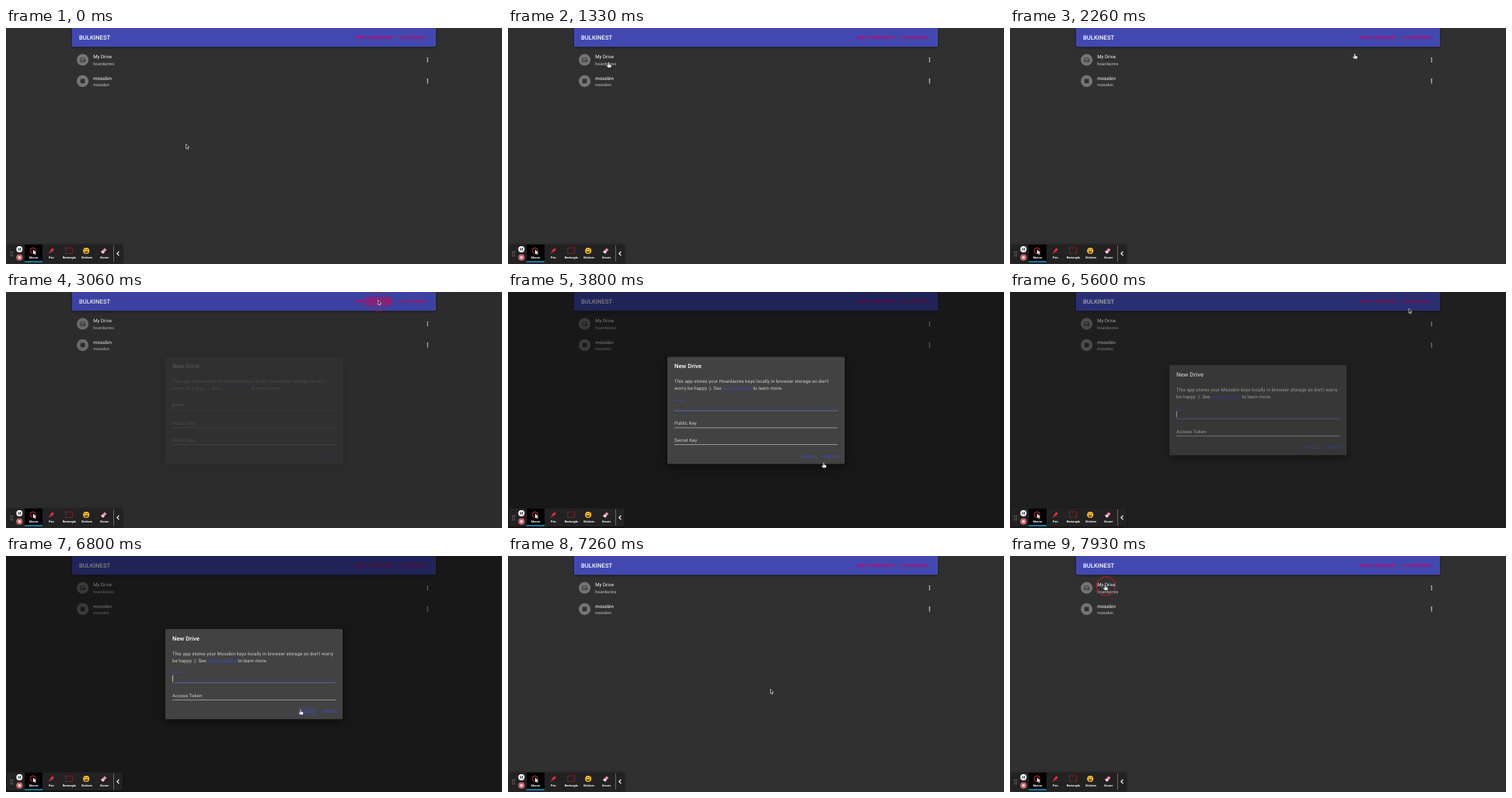
An HTML page that plays this animation: 638x304 px, repeating every 8 s.

```html
<!DOCTYPE html>
<html lang="en">
<head>
<meta charset="utf-8">
<title>Drive list</title>
<style>
  html, body { margin: 0; width: 100%; height: 100%; overflow: hidden; background: #303030; }
  svg { display: block; width: 638px; height: 304px; }
  text { font-family: Roboto, sans-serif; font-size: 6.08px; letter-spacing: .0094em; fill: #fff; text-rendering: geometricPrecision; white-space: pre; }
  .title { font-size: 7.6px; font-weight: 500; letter-spacing: .0075em; }
  .button { font-size: 5.32px; font-weight: 500; letter-spacing: .0286em; }
  .soft { fill: #fffb; }
  .small { font-size: 5.32px; }
  .pink { fill: #d8005f; }
  .blue { fill: #3f4bb5; }
  .mid { text-anchor: middle; }
  .tool { font-size: 3.8px; font-weight: 700; text-anchor: middle; letter-spacing: 0; }
  .bar { filter: drop-shadow(0 1px 1.5px #0007); }
  .paper { fill: #424242; filter: drop-shadow(0 4px 6px #0008); }
</style>
</head>
<body>
<svg viewBox="0 0 638 304">
  <defs>
    <clipPath id="addClip"><rect id="addBox" rx="1.5"/></clipPath>
  </defs>
  <rect width="638" height="304" fill="#303030"/>
  <rect class="bar" x="85" width="468" height="24.2" fill="#4149b1"/>
  <text class="title" x="94" y="15">BULKINEST</text>
  <rect id="hover" rx="1.5"/>
  <circle id="ripple" fill="#f50057" clip-path="url(#addClip)"/>
  <text class="button pink" x="496.8" y="14.1" text-anchor="end">ADD HOARDACRES</text>
  <text class="button pink" x="540.8" y="14.1" text-anchor="end">ADD MOSSBIN</text>
  <g id="rows"></g>

  <rect id="backdrop" width="638" height="304"/>
  <g id="dialogs"></g>

  <g id="toolbar">
    <rect x="1" y="278.5" width="149" height="23.5" rx="2" fill="#222" class="bar"/>
    <path d="M5.5 288.5h3.5M5.5 291h3.5M5.5 293.5h3.5" stroke="#aaa" stroke-width=".9" stroke-dasharray="1.1 1.2"/>
    <circle cx="17.3" cy="285" r="4" fill="#fff"/>
    <path d="M16.2 283.2v3.6M18.4 283.2v3.6" stroke="#222" stroke-width="1.1"/>
    <circle cx="17.3" cy="295.6" r="3.7" fill="#e5404b" stroke="#f3b5b9" stroke-width=".6"/>
    <rect x="15.8" y="294.1" width="3" height="3" fill="#fff"/>
    <rect x="24" y="279" width="23" height="22.5" fill="#000"/>
    <rect x="24" y="300.2" width="23" height="1.5" fill="#18a0d8"/>
    <circle cx="34.8" cy="286.8" r="3.6" fill="none" stroke="#e0404c" stroke-width=".9"/>
    <path d="M35 285.5v6l1.4-1.3 1 2 .9-.4-.9-2h1.8z" fill="#fff"/>
    <path d="M55.3 290.2l.6-2.5 1.7 1.8zM56.4 287l3.4-3.6 2 2-3.5 3.6z" fill="#f0323c"/>
    <rect x="76.8" y="283.2" width="9" height="7.4" fill="none" stroke="#c81e28" stroke-width=".9" stroke-dasharray="1.8 1"/>
    <circle cx="103.2" cy="287" r="4" fill="#f8c32c"/>
    <path d="M100.7 287.6h5q-.4 2.5-2.5 2.5t-2.5-2.5z" fill="#7a3b12"/>
    <path d="M101 285.6h1.4M104 285.6h1.4" stroke="#5a3010" stroke-width=".9"/>
    <path d="M122.2 288.4l4.6-5 2.8 2.3-4.6 5z" fill="#f08a9c"/>
    <path d="M122.2 288.4l1.7-1.9 2.8 2.3-1.7 1.9z" fill="#f7d3d8"/>
    <path d="M138.5 280v21" stroke="#888" stroke-width=".7"/>
    <path d="M145.4 287.8l-2.5 2.7 2.5 2.7" fill="none" stroke="#fff" stroke-width="1.2"/>
  </g>

  <circle id="ring" r="12.3" fill="none" stroke="#cf1626" stroke-width="1"/>
  <g id="cursor">
    <path id="arrow" d="M0 0v5.8l1.3-1.2.9 2 1-.4-.9-2h1.8z" fill="#111" stroke="#fff" stroke-width=".6"/>
    <path id="hand" d="M-.7.5q.7-.9 1.4 0v2.4l2.2.5q.8.3.6 1.2l-.5 2.4h-3.8l-1.8-2.5q0-1 .9-.7l1 .7z" fill="#fff" stroke="#222" stroke-width=".4"/>
  </g>
</svg>
<script>
const LOOP = 8000;
const $ = id => document.getElementById(id);
const set = (el, attrs) => { for (const k in attrs) el.setAttribute(k, attrs[k]); };
const clamp = v => Math.max(0, Math.min(1, v));

// Cursor hotspot: time, x, y
const path = [
  [0, 231.5, 149.5], [60, 231.5, 149.5], [860, 124, 45], [1200, 124, 44], [1330, 129.5, 44],
  [1660, 138, 44], [1800, 138, 44], [2450, 522, 30], [2900, 478.5, 10.5], [3480, 478.5, 10.5],
  [3800, 406, 219.5], [4200, 388, 210], [4540, 388, 210], [4730, 523.5, 25.5], [5200, 522, 11],
  [5520, 522, 11], [6060, 372, 182], [6800, 379, 197.5], [7080, 379, 197.5], [7790, 122.5, 37], [LOOP, 122.5, 37]
];
const clicks = [2900, 4490, 5390, 6990, 7880];
const dialogs = [
  { top: 83.5, open: 3010, close: 4600, fields: ["Public Key", "Secret Key"],
    lines: ["This app stores your Hoardacres keys locally in browser storage so don't", "worry be happy :). See "] },
  { top: 94, open: 5500, close: 7080, fields: ["Access Token"],
    lines: ["This app stores your Mossbin keys locally in browser storage so don't worry", "be happy :). See "] }
];
const addButtons = [
  { x: 446, y: 5.4, w: 54, h: 13.7 },
  { x: 500, y: 5.4, w: 44, h: 13.7 }
];

// Standard material easing, cubic-bezier(.4, 0, .2, 1)
function ease(p) {
  let lo = 0, hi = 1, s = .5;
  for (let i = 0; i < 16; i++) {
    const r = 1 - s, x = 1.2 * r * r * s + .6 * r * s * s + s ** 3;
    if (x < p) lo = s; else hi = s;
    s = (lo + hi) / 2;
  }
  return s * s * (3 - 2 * s);
}

const label = (x, y, cls, text) => `<text x="${x}" y="${y}" class="${cls}">${text}</text>`;

const driveIcon = `<path d="M-3.2.4L-2-2.5H2L3.2.4V2.6H-3.2zM-3.2.4H3.2M.6 1.5H2.2" fill="none" stroke="#303030" stroke-width=".8" stroke-linejoin="round"/>`;
const squareIcon = `<rect x="-2.8" y="-2.8" width="5.6" height="5.6" fill="#303030"/>`;
$("rows").innerHTML = [["My Drive", "hoardacres", driveIcon], ["mossbin", "mossbin", squareIcon]]
  .map(([name, kind, icon], i) => `<g transform="translate(0 ${41 + i * 27.4})">
    <g transform="translate(98.6 0)"><circle r="7.6" fill="#757575"/>${icon}</g>
    ${label(112.2, -1.8, "", name)}${label(112.2, 6.5, "soft small", kind)}
    ${[-2.3, 0, 2.3].map(y => `<circle cx="542.3" cy="${y}" r=".8" fill="#fff"/>`).join("")}</g>`).join("");

$("dialogs").innerHTML = dialogs.map(d => {
  const height = 94.7 + 21.6 * d.fields.length;
  d.cancel = { x: 374, y: d.top + height - 16.7, w: 26.5, h: 13.7 };
  d.create = { x: 403, y: d.cancel.y, w: 27, h: 13.7 };
  const fields = d.fields.map((name, i) => {
    const y = 91.4 + i * 21.6;
    return label(214, y - 3.9, "soft", name) +
      `<path d="M214 ${y}h210" stroke="#fffb" stroke-width=".6"/>`;
  }).join("");
  return `<g transform="translate(0 ${d.top})">
    <rect class="paper" x="205" width="228" height="${height}" rx="1.5"/>
    ${label(214, 14.8, "title", "New Drive")}
    ${label(214, 33.8, "soft", d.lines[0])}
    ${label(214, 42.9, "soft", d.lines[1] + '<tspan class="blue">privacy policy</tspan> to learn more.')}
    <text class="name">Name</text>
    <path d="M214 69.3h210" stroke="#fffb" stroke-width=".4"/>
    <path class="focus" d="M214 69.3h210" stroke="#3f4bb5" stroke-width=".8"/>
    <path class="caret" d="M214.4 59.6v8" stroke="#fff" stroke-width=".7"/>
    ${fields}
    <rect class="hover" x="374" y="${height - 16.7}" width="26.5" height="13.7" rx="1.5" fill="#3f51b5"/>
    ${label(387.2, height - 7.9, "button blue mid", "CANCEL")}
    ${label(416.6, height - 7.9, "button blue mid", "CREATE")}</g>`;
}).join("");
dialogs.forEach((d, i) => d.el = $("dialogs").children[i]);

$("toolbar").insertAdjacentHTML("beforeend",
  [["Mouse", 35.6], ["Pen", 58.3], ["Rectangle", 81.2], ["Stickers", 104], ["Eraser", 126.6]]
    .map(([name, x]) => label(x, 297, "tool", name)).join(""));

set($("addBox"), { x: 446, y: 5.4, width: 54, height: 13.7 });

function cursorAt(t) {
  const i = path.findIndex(k => k[0] > t);
  const [t0, x0, y0] = path[i - 1], [t1, x1, y1] = path[i];
  const p = (t - t0) / (t1 - t0), e = p * p * (3 - 2 * p);
  return [x0 + (x1 - x0) * e, y0 + (y1 - y0) * e];
}

function drawDialog(d, t, overCancel) {
  const leaving = t >= d.close;
  const fade = leaving ? 1 - ease(clamp((t - d.close) / 195)) : ease(clamp((t - d.open) / 225));
  const focus = leaving ? 1 - ease(clamp((t - d.close) / 120)) : ease(clamp((t - d.open) / 200));
  const part = cls => d.el.querySelector("." + cls);
  set(d.el, { opacity: fade });
  set(part("name"), {
    transform: `translate(214 ${66 - 8.6 * focus}) scale(${1 - .25 * focus})`,
    fill: "#fff"
  });
  part("name").style.fill = focus > .5 ? "#3f4bb5" : "#fffb";
  set(part("focus"), { opacity: focus });
  set(part("caret"), { opacity: !leaving && (t - d.open) % 1000 < 500 ? 1 : 0 });
  set(part("hover"), { opacity: overCancel || leaving ? .12 : 0 });
  return fade;
}

function draw(t) {
  const [x, y] = cursorAt(t);
  const inside = (b, pad = 0) => x > b.x - pad && x < b.x + b.w + pad && y > b.y - pad && y < b.y + b.h + pad;
  const active = dialogs.find(d => t >= d.open && t < d.close);

  const fades = dialogs.map(d => drawDialog(d, t, d === active && inside(d.cancel)));
  set($("backdrop"), { opacity: .5 * Math.max(...fades) });

  const hovered = !active && addButtons.find(b => inside(b));
  set($("hover"), { opacity: hovered ? .08 : 0, fill: "#f50057" });
  if (hovered) set($("hover"), { x: hovered.x, y: hovered.y, width: hovered.w, height: hovered.h });

  const age = t - clicks[0];
  const rippling = age >= 0 && age < 600;
  set($("ripple"), {
    cx: 478.5, cy: 12, r: rippling ? 34 * ease(clamp(age / 450)) : 0,
    opacity: rippling ? .3 * (1 - clamp((age - 150) / 450)) : 0
  });

  const click = clicks.find(c => t >= c && t < c + 220);
  set($("ring"), { cx: x + 1, cy: y + 1.8, opacity: click ? 1 - clamp((t - click - 120) / 100) : 0 });

  const targets = active ? [active.cancel, active.create]
    : [...addButtons, { x: 85, y: 29.5, w: 468, h: 51 }];
  const pointing = targets.some(b => inside(b, 2));
  set($("cursor"), { transform: `translate(${x} ${y})` });
  set($("hand"), { opacity: pointing ? 1 : 0 });
  set($("arrow"), { opacity: pointing ? 0 : 1 });
}

const start = performance.now();
function frame() {
  draw((performance.now() - start) % LOOP);
  requestAnimationFrame(frame);
}
frame();
</script>
</body>
</html>
```
